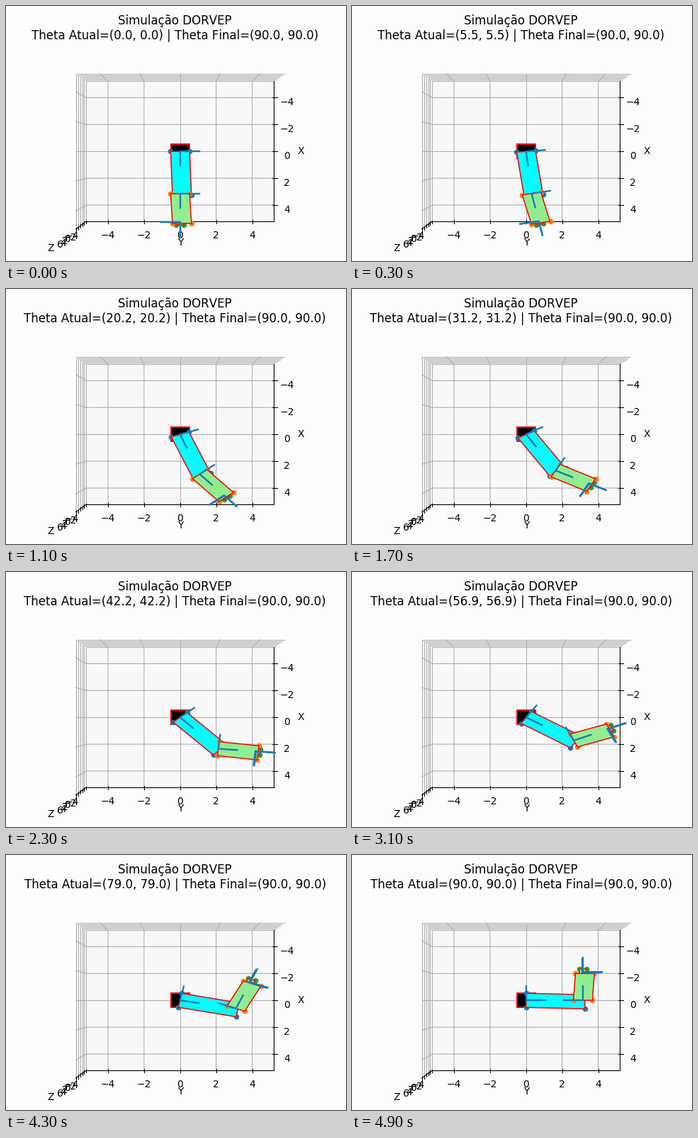
Animation of 480x360 px, one loop 7900 ms. Source, as a matplotlib script:

```python
import numpy as np
import matplotlib.pyplot as plt
from matplotlib.animation import FuncAnimation

plt.rcParams["text.kerning_factor"] = 6

STEPS, HOLD, DT = 50, 29, 100
GOAL = 90.0
L1, L2 = 3.0, 2.0
DROP = 2.0                              # travel of the last joint along z
CX, CY = 245.8, 205.2                   # view centre in pixels
LO, HI = -5 - 10 / 48, 5 + 10 / 48      # padded box limits, x and y
ZLO, ZHI = -4 - 10 / 48, 6 + 10 / 48
BLUE, ORANGE, GREEN = "tab:blue", "tab:orange", "tab:green"

fig = plt.figure(figsize=(4.8, 3.6), dpi=100, facecolor="#fdfdfd")
ax = fig.add_axes([0, 0, 1, 1])
ax.set(xlim=(0, 480), ylim=(360, 0))
ax.axis("off")


def project(x, y, z):
    """Top view with mild perspective: data -> stage pixels."""
    depth = 10 - (np.asarray(z) - 1) / 10
    return CX + 267.6 * np.asarray(y) / depth, CY + 199.4 * np.asarray(x) / depth


def line(points, color, lw, z):
    px, py = project(*np.array(points, float).T)
    return ax.plot(px, py, color=color, lw=lw, zorder=z)[0]


def pane(points, color):
    px, py = project(*np.array(points, float).T)
    ax.fill(px, py, fc=color, ec=color, lw=0.8, zorder=0)


def label(px, py, s):
    ax.text(px, py, s, size=10, ha="center", va="center", zorder=3)


def number(v):
    return str(v).replace("-", "\u2212")


def draw_box():
    pane([(LO, LO, ZLO), (LO, HI, ZLO), (LO, HI, ZHI), (LO, LO, ZHI)], "#f9f9f9")
    pane([(LO, LO, ZLO), (HI, LO, ZLO), (HI, LO, ZHI), (LO, LO, ZHI)], "#f7f7f7")
    pane([(LO, LO, ZLO), (HI, LO, ZLO), (HI, HI, ZLO), (LO, HI, ZLO)], "#f8f8f8")

    grid = dict(color="#b0b0b0", lw=0.8, z=1)
    axis = dict(color="black", lw=0.8, z=2)
    inner, outer = HI - 0.083, HI + 0.167
    for v in range(-4, 5, 2):
        line([(v, HI, ZLO), (v, LO, ZLO), (v, LO, ZHI)], **grid)
        line([(HI, v, ZLO), (LO, v, ZLO), (LO, v, ZHI)], **grid)
        line([(v, inner, ZLO), (v, outer, ZLO)], **axis)
        line([(inner, v, ZLO), (outer, v, ZLO)], **axis)
        px, py = project(v, 5.92, ZLO)
        label(px, py + 6.5, number(v))
        label(*project(6.29, v, ZLO), number(v))
    for v in range(-4, 7, 2):
        line([(HI, LO, v), (LO, LO, v), (LO, HI, v)], **grid)
        line([(inner, LO, v), (outer, LO, v)], **axis)
        label(*project(6.29, -6.0, v), number(v))

    line([(LO, HI, ZLO), (HI, HI, ZLO)], **axis)
    line([(HI, LO, ZLO), (HI, HI, ZLO)], **axis)
    line([(HI, LO, ZLO), (HI, LO, ZHI)], **axis)
    label(416.5, 205, "X")
    label(246, 333.5, "Y")
    label(63.5, 342.5, "Z")


class Plate:
    """Red-edged polygon with round markers under its corners."""

    def __init__(self, face, dot, z):
        self.dots, = ax.plot([], [], "o", color=dot, ms=4.47, mew=1, zorder=z)
        self.poly, = ax.fill([0, 0, 0], [0, 0, 0], fc=face, ec="red", lw=1.1, zorder=z + 0.5)

    def place(self, corners):
        px, py = project(*np.array(corners).T, 1)
        self.dots.set_data(px, py)
        self.poly.set_xy(np.column_stack([px, py]))


def basis(angle):
    c, s = np.cos(angle), np.sin(angle)
    return np.array([c, s]), np.array([-s, c])


def link_corners(start, end, side):
    skew = 0.1
    return [start - side / 2, start + side / 2, end + side / 2 + skew, end - side / 2 + skew]


def tripod():
    return ax.plot([], [], color=BLUE, lw=1.7, zorder=9)[0]


def place_tripod(artist, origin, fwd, side, z=1):
    pts = np.array([origin + fwd, origin, origin + side])
    artist.set_data(*project(*pts.T, z))


draw_box()
bx, by = project([-0.5, -0.5, 0.5, 0.5], [-0.5, 0.5, 0.5, -0.5], 0)
ax.fill(bx, by, fc="black", ec="red", lw=1.4, zorder=4)

arm = Plate("cyan", BLUE, 5)
tool = Plate("lightgreen", GREEN, 6)
forearm = Plate("lightgreen", ORANGE, 7)
tripods = [tripod() for _ in range(4)]
title = ax.text(238.8, 47, "", size=12, ha="center", va="baseline")


def update(i):
    part = min(i, STEPS - 1) / (STEPS - 1)
    deg = GOAL * part
    t = np.radians(deg)
    f1, s1 = basis(t)
    f2, s2 = basis(2 * t)
    base = np.zeros(2)
    elbow = L1 * f1
    tip = elbow + L2 * f2

    arm.place(link_corners(base, elbow, s1))
    forearm.place(link_corners(elbow, tip, s2))
    tool.place([tip + 0.2 * (a * f2 + b * s2)
                for a, b in ((-1, -1), (-1, 1), (1, 1), (1, -1))])
    place_tripod(tripods[0], base, f1, s1)
    place_tripod(tripods[1], elbow, f2, s2)
    place_tripod(tripods[2], tip, f2, -s2)
    place_tripod(tripods[3], tip, f2, -s2, z=1 - DROP * part)
    title.set_text("Simulação DORVEP\n"
                   f"Theta Atual=({deg:.1f}, {deg:.1f}) | "
                   f"Theta Final=({GOAL:.1f}, {GOAL:.1f})")


anim = FuncAnimation(fig, update, frames=STEPS + HOLD, init_func=lambda: update(0),
                     interval=DT, repeat=True, repeat_delay=0, blit=False)
plt.show()
```
